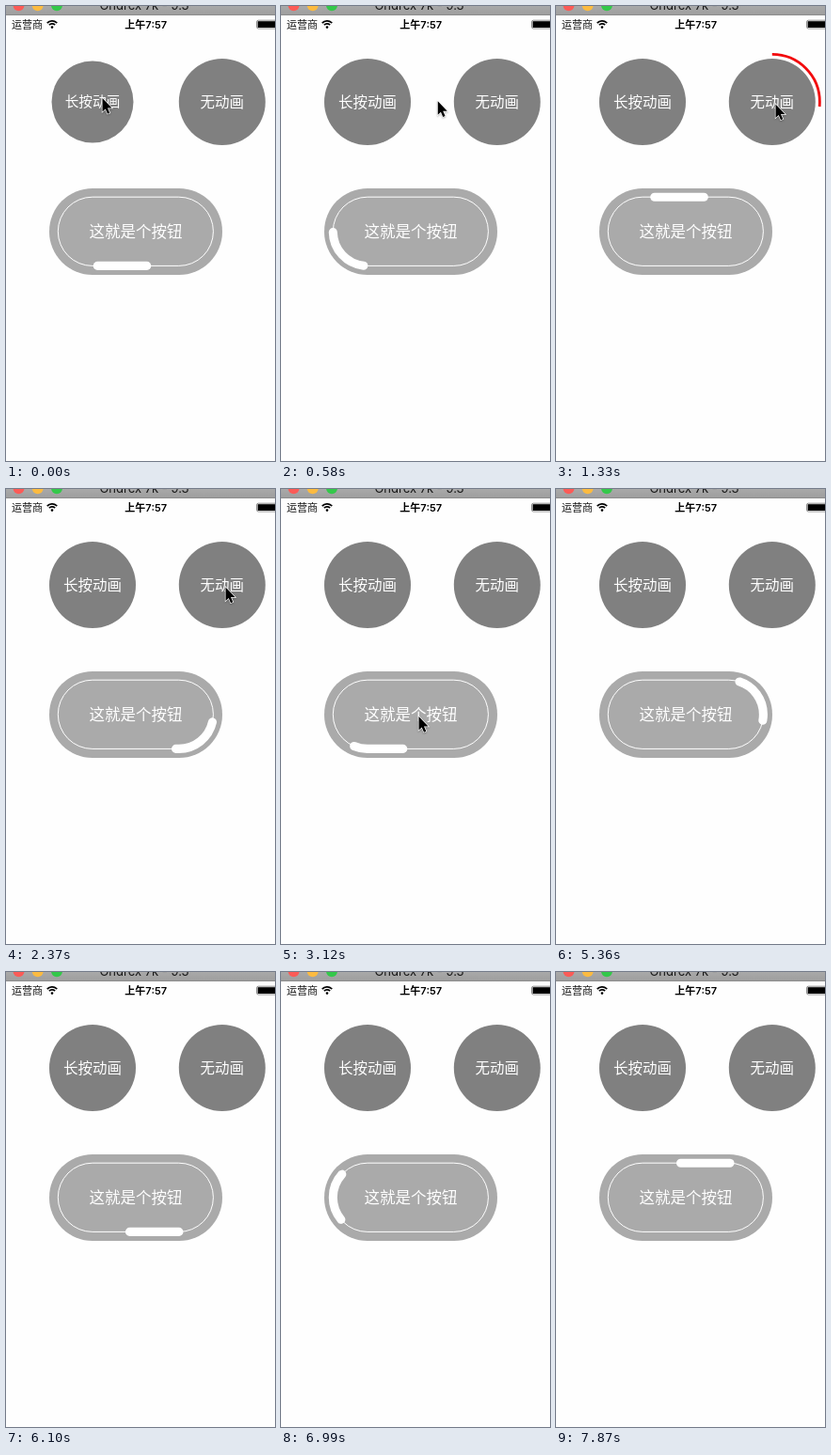
An HTML page with a canvas that plays this animation: 286 by 484 pixels, repeating every 7970 ms.

```html
<!DOCTYPE html>
<html lang="zh-CN">
<head>
<meta charset="utf-8">
<title>按钮动画</title>
<style>
  html, body { margin: 0; width: 100%; height: 100%; overflow: hidden; background: #fefefe; }
  canvas { display: block; width: 286px; height: 484px; }
</style>
</head>
<body>
<canvas id="stage"></canvas>
<script>
const W = 286, H = 484, LOOP = 7970, STEP = 148.5;
const canvas = document.getElementById('stage');
const ctx = canvas.getContext('2d');
const dpr = window.devicePixelRatio || 1;
canvas.width = W * dpr;
canvas.height = H * dpr;

const CJK = '"Noto Sans CJK SC", "Noto Sans CJK", sans-serif';
const LATIN = 'Inter, ' + CJK;
const TAU = Math.PI * 2;

// Capsule outline that the white dash travels along, clockwise from top left.
const ring = { left: 91.9, right: 183.8, mid: 239.8, r: 36.6 };
const ringLength = 2 * (ring.right - ring.left) + TAU * ring.r;
const DASH = 52.5, SPEED = ringLength / 2975;

function dot(x, y, r, color) {
  ctx.fillStyle = color;
  ctx.beginPath();
  ctx.arc(x, y, r, 0, TAU);
  ctx.fill();
}

function label(text, x, y, font, color, align = 'center') {
  ctx.font = font;
  ctx.fillStyle = color;
  ctx.textAlign = align;
  ctx.fillText(text, x, y);
}

function capsulePath(left, right, mid, r) {
  ctx.beginPath();
  ctx.moveTo(left, mid - r);
  ctx.lineTo(right, mid - r);
  ctx.arc(right, mid, r, -Math.PI / 2, Math.PI / 2);
  ctx.lineTo(left, mid + r);
  ctx.arc(left, mid, r, Math.PI / 2, Math.PI * 1.5);
  ctx.closePath();
}

function ease(t, from, to) {
  const p = Math.min(1, Math.max(0, (t - from) / (to - from)));
  return p * p * (3 - 2 * p);
}

function drawTitleBar() {
  const g = ctx.createLinearGradient(0, 0, 0, 10);
  g.addColorStop(0, '#a9a9a9');
  g.addColorStop(1, '#9d9d9d');
  ctx.fillStyle = g;
  ctx.fillRect(0, 0, W, 10);
  ctx.fillStyle = '#8c8c8c';
  ctx.fillRect(0, 9, W, 1);
  dot(13.5, -0.8, 6, '#fc5b57');
  dot(33.7, -0.8, 6, '#fdbb40');
  dot(54, -0.8, 6, '#34c84a');
  label('Ondrex 7k - 9.3', 147, 4, '13px ' + LATIN, '#161616');
}

function drawStatusBar() {
  label('运营商', 6, 23.7, '11px ' + CJK, '#111', 'left');
  label('上午7:57', 148.7, 23.6, '600 11px ' + LATIN, '#000');

  dot(49, 22.6, 1.3, '#000');
  ctx.strokeStyle = '#000';
  ctx.lineWidth = 1.7;
  for (const r of [4.2, 7.2]) {
    ctx.beginPath();
    ctx.arc(49, 23, r, -Math.PI * 0.76, -Math.PI * 0.24);
    ctx.stroke();
  }

  ctx.strokeStyle = '#777';
  ctx.lineWidth = 0.8;
  ctx.beginPath();
  ctx.roundRect(266.5, 15.2, 24, 8.8, 1.8);
  ctx.stroke();
  ctx.fillStyle = '#000';
  ctx.fillRect(267.6, 16.2, 22, 6.8);
}

function drawRoundButton(x, text, scale) {
  ctx.save();
  ctx.translate(x, 102);
  ctx.scale(scale, scale);
  dot(0, 0, 46, '#808080');
  label(text, 0, 5.8, '15.5px ' + CJK, '#fff');
  ctx.restore();
}

function drawProgress(t) {
  if (t < 805 || t > 2200) return;
  const angle = (t - 805) / 2000 * TAU;
  ctx.strokeStyle = '#f20a0d';
  ctx.lineWidth = 2.8;
  ctx.beginPath();
  ctx.arc(229.8, 102, 50.6, -Math.PI / 2, angle - Math.PI / 2);
  ctx.stroke();
}

// Centre of the dash along the outline, or null while it is stopped.
function dashCentre(t) {
  if (t < 3500) return 267 + SPEED * t;
  if (t < 4890) return null;
  return 67.5 + SPEED * (t - 4900);
}

function drawCapsule(t) {
  ctx.fillStyle = '#aaa';
  capsulePath(92, 184, 239.9, 46);
  ctx.fill();

  const pressed = t > 3500 && t < 4440;
  if (!pressed) {
    capsulePath(ring.left, ring.right, ring.mid, ring.r);
    ctx.strokeStyle = '#fff';
    ctx.lineWidth = 1;
    ctx.stroke();

    const centre = dashCentre(t);
    if (centre !== null) {
      ctx.save();
      ctx.lineWidth = 9.1;
      ctx.lineCap = 'round';
      ctx.setLineDash([DASH, ringLength - DASH]);
      ctx.lineDashOffset = -((centre - DASH / 2) % ringLength);
      ctx.stroke();
      ctx.restore();
    }
  }
  label('这就是个按钮', 138, 246, '16.5px ' + CJK, '#fff');
}

function drawCursor(t) {
  if (t > 4890) return;
  const a = ease(t, 100, 800), b = ease(t, 2376, 2980);
  const x = 102 + 131 * a - 87 * b;
  const y = 97.5 + 6.5 * a + 137.5 * b;
  ctx.save();
  ctx.translate(x, y);
  ctx.beginPath();
  ctx.moveTo(0.5, 0.6);
  ctx.lineTo(0.5, 15);
  ctx.lineTo(3.7, 12);
  ctx.lineTo(6, 17.2);
  ctx.lineTo(8.3, 16.2);
  ctx.lineTo(6, 11);
  ctx.lineTo(10.5, 11);
  ctx.closePath();
  ctx.shadowColor = 'rgba(0,0,0,.3)';
  ctx.shadowBlur = 2 * dpr;
  ctx.shadowOffsetY = dpr;
  ctx.strokeStyle = '#fff';
  ctx.lineWidth = 1.4;
  ctx.stroke();
  ctx.shadowColor = 'transparent';
  ctx.fillStyle = '#000';
  ctx.fill();
  ctx.restore();
}

function draw(t) {
  ctx.setTransform(dpr, 0, 0, dpr, 0, 0);
  ctx.fillStyle = '#fefefe';
  ctx.fillRect(0, 0, W, H);
  drawTitleBar();
  drawStatusBar();
  drawRoundButton(92, '长按动画', 0.945 + 0.055 * ease(t, 0, 290));
  drawRoundButton(229.8, '无动画', 1);
  drawProgress(t);
  drawCapsule(t);
  drawCursor(t);
}

// Motion is sampled at a fixed step, like a screen recording.
const start = performance.now();
function tick() {
  const t = (performance.now() - start) % LOOP;
  draw(Math.min(53, Math.floor((t + 9) / STEP)) * STEP);
  requestAnimationFrame(tick);
}
tick();
</script>
</body>
</html>
```
